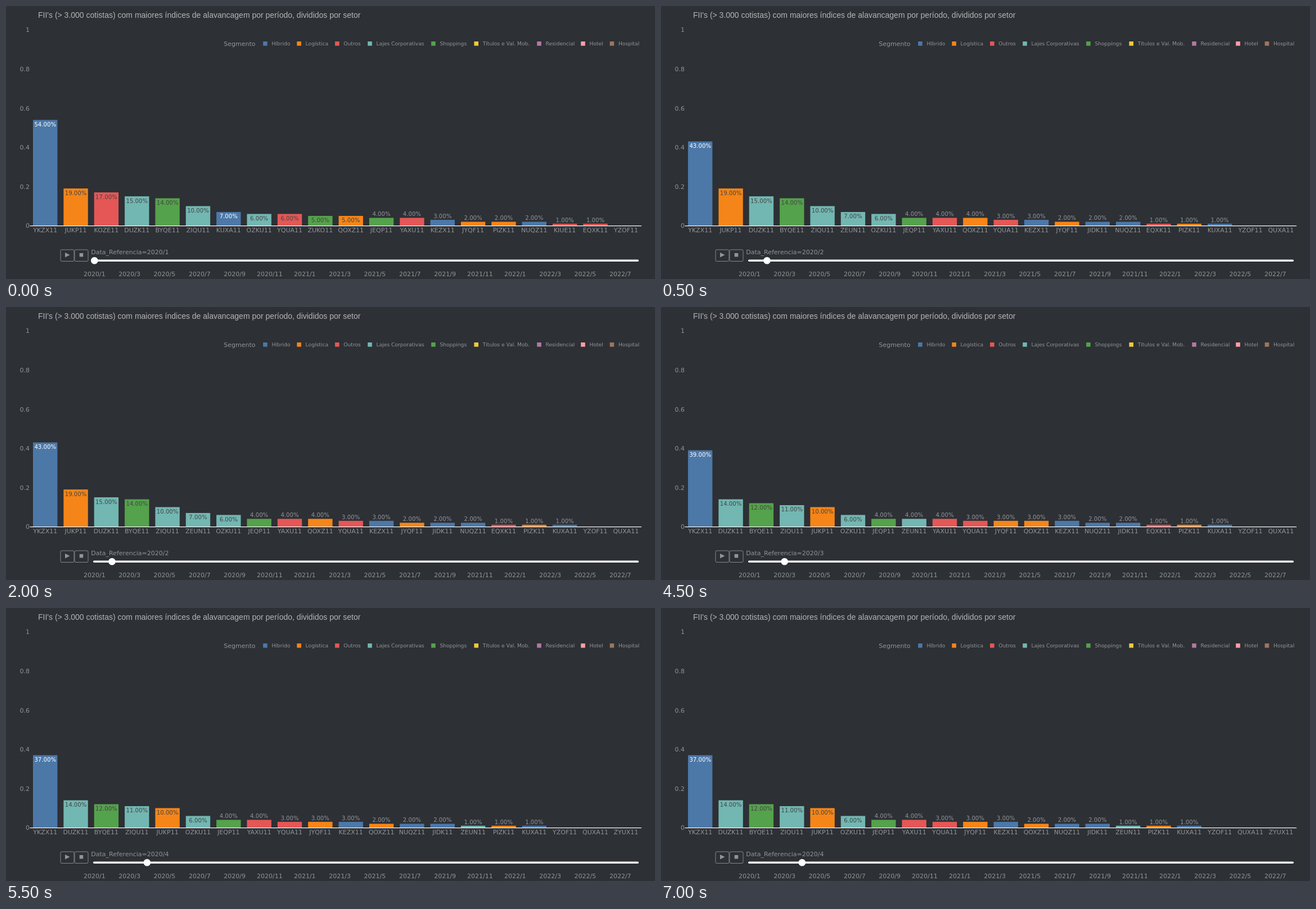
An HTML page for the animation above (8000 ms loop, 1154x485 px).

```html
<!DOCTYPE html>
<html lang="pt">
<head>
<meta charset="utf-8">
<style>
html, body { margin: 0; width: 100%; height: 100%; overflow: hidden; background: #2d3035; }
svg { display: block; width: 1154px; height: 485px; font: 11px "DejaVu Sans", Verdana, sans-serif; fill: #929497; }
.title { font: 14px "Liberation Sans", Arial, sans-serif; fill: #b3b5b7; }
.legend { font-size: 9.17px; }
.value { font-size: 10.15px; }
</style>
</head>
<body>
<svg viewBox="0 0 1154 485"><g id="back"></g><g id="bars"></g><g id="front"></g><g id="slider"></g></svg>
<script>
const segments = [
  ['Híbrido', '#4c78a8', 472.4], ['Logística', '#f58518', 532.6], ['Outros', '#e45756', 600.3],
  ['Lajes Corporativas', '#72b7b2', 658.5], ['Shoppings', '#54a24b', 771.4],
  ['Títulos e Val. Mob.', '#eeca3b', 847.7], ['Residencial', '#b279a2', 959.5],
  ['Hotel', '#ff9da6', 1037.5], ['Hospital', '#9d755d', 1088.9]
];

// Tickers grouped by segment, in legend order
const groups = ['YKZX KUXA KEZX NUQZ JIDK', 'JUKP QOXZ JYQF PIZK', 'KOZE YQUA YAXU KIUE EQXK',
  'DUZK ZIQU OZKU ZEUN', 'BYQE ZUKO JEQP'];
const segmentOf = {};
groups.forEach((g, i) => g.split(' ').forEach(t => segmentOf[t] = i));

// Start time in ms, then the ranking as ticker + percentage
const periods = [
  [0, 'YKZX54 JUKP19 KOZE17 DUZK15 BYQE14 ZIQU10 KUXA7 OZKU6 YQUA6 ZUKO5 QOXZ5 JEQP4 YAXU4 KEZX3 JYQF2 PIZK2 NUQZ2 KIUE1 EQXK1 YZOF0'],
  [500, 'YKZX43 JUKP19 DUZK15 BYQE14 ZIQU10 ZEUN7 OZKU6 JEQP4 YAXU4 QOXZ4 YQUA3 KEZX3 JYQF2 JIDK2 NUQZ2 EQXK1 PIZK1 KUXA1 YZOF0 QUXA0'],
  [3000, 'YKZX39 DUZK14 BYQE12 ZIQU11 JUKP10 OZKU6 JEQP4 ZEUN4 YAXU4 YQUA3 JYQF3 QOXZ3 KEZX3 NUQZ2 JIDK2 EQXK1 PIZK1 KUXA1 YZOF0 QUXA0'],
  [5500, 'YKZX37 DUZK14 BYQE12 ZIQU11 JUKP10 OZKU6 JEQP4 YAXU4 YQUA3 JYQF3 KEZX3 QOXZ2 NUQZ2 JIDK2 ZEUN1 PIZK1 KUXA1 YZOF0 QUXA0 ZYUX0']
];
const duration = 8000, baseY = 390.3, unit = 348;

const $ = id => document.getElementById(id);
const text = (x, y, s, attrs = '') => `<text x="${x}" y="${y}" ${attrs}>${s}</text>`;
const rect = (x, y, w, h, attrs = '') => `<rect x="${x}" y="${y}" width="${w}" height="${h}" ${attrs}/>`;
const middle = 'text-anchor="middle"';

function drawStatic() {
  let back = text(57, 21.3, "FII's (&gt; 3.000 cotistas) com maiores índices de alavancagem por período, divididos por setor", 'class="title"');
  for (let i = 0; i <= 5; i++)
    back += text(42, baseY - i / 5 * unit + 4, i / 5, 'text-anchor="end"');
  back += text(387.3, 71, 'Segmento');
  for (const [name, color, x] of segments)
    back += rect(x - 15.3, 63, 7.6, 7.6, `fill="${color}"`) + text(x, 70.3, name, 'class="legend"');
  $('back').innerHTML = back;

  let front = rect(42.5, 390, 1087.5, 1.2, 'fill="#fff"');
  for (const x of [97, 122])
    front += rect(x, 433, 24, 20.5, 'rx="2" fill="none" stroke="#85878a"');
  front += '<path d="M105 438l8.5 4.2l-8.5 4.2z"/>' + rect(130.7, 439, 6.5, 6.5);
  front += rect(155, 450.5, 970, 3.4, 'rx="1.7" fill="#fff"');
  for (let i = 0; i < 16; i++)
    front += text(157.3 + i * 62.33, 480, `${2020 + Math.floor(i / 6)}/${i % 6 * 2 + 1}`, middle);
  $('front').innerHTML = front;
}

function drawPeriod(p) {
  $('bars').innerHTML = periods[p][1].split(' ').map((entry, i) => {
    const ticker = entry.slice(0, 4), value = +entry.slice(4);
    const x = 69.7 + i * 54.35, h = value / 100 * unit, y = baseY - h;
    const label = text(x, 402, ticker + '11', middle);
    if (!value) return label;
    const seg = segmentOf[ticker], inside = value >= 5;
    const ink = !inside ? '' : seg ? 'fill="#444"' : 'fill="#fff"';
    return label + rect(x - 21.7, y, 43.4, h, `fill="${segments[seg][1]}"`) +
      text(x, y + (inside ? 11.4 : -3), value.toFixed(2) + '%', `class="value" ${middle} ${ink}`);
  }).join('');
  $('slider').innerHTML = text(151.3, 440.6, 'Data_Referencia=2020/' + (p + 1)) +
    `<circle cx="${157.3 + p * 31.17}" cy="452.2" r="6.3" fill="#fff"/>`;
}

let shown = -1;
const start = performance.now();
function tick() {
  const t = (performance.now() - start) % duration;
  const p = periods.findLastIndex(([from]) => t >= from);
  if (p !== shown) drawPeriod(shown = p);
  requestAnimationFrame(tick);
}
drawStatic();
tick();
</script>
</body>
</html>
```
